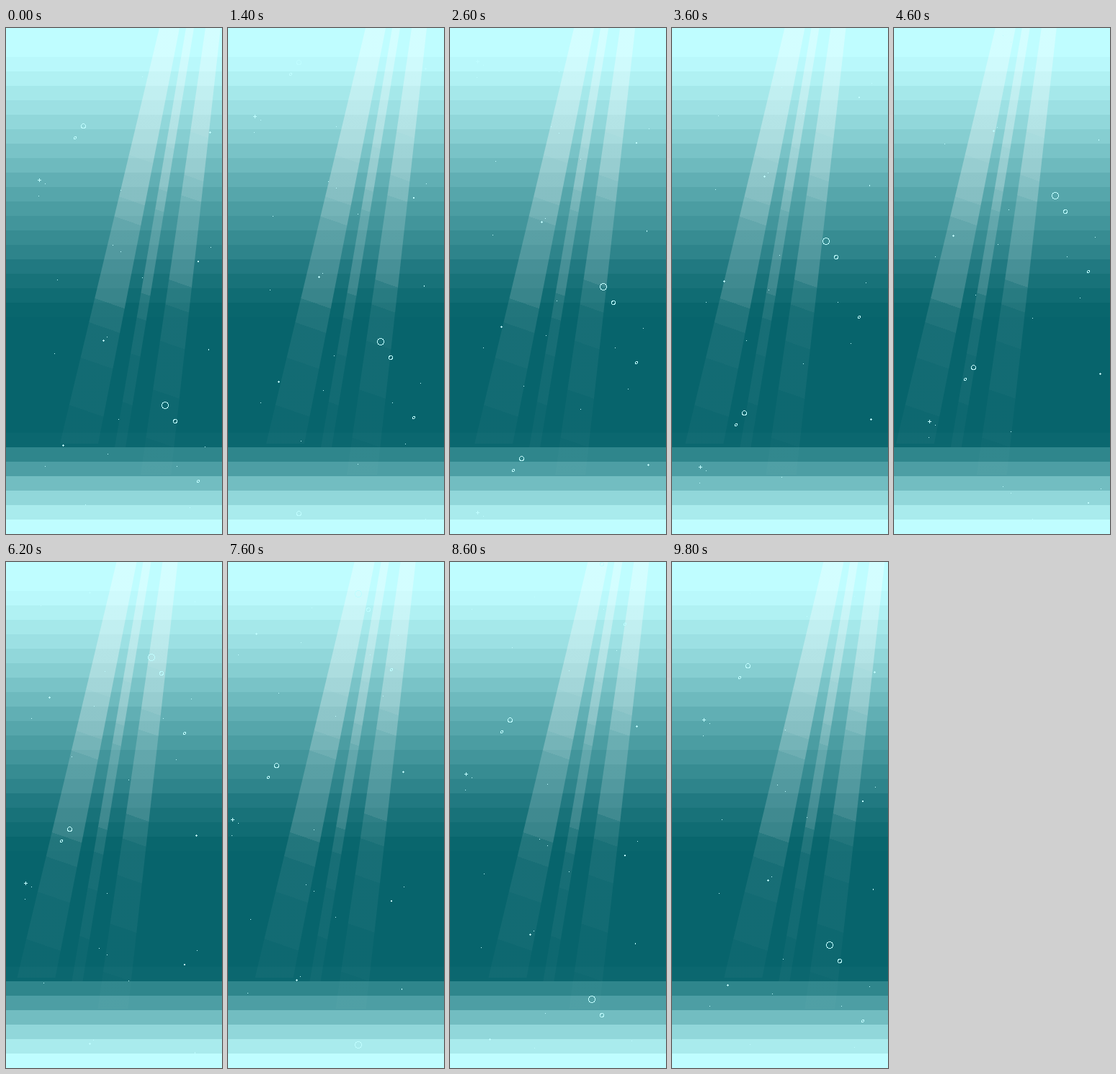
These frames come from a looping animation (300x700 px, 10 s). An HTML page without scripts:

```html
<!DOCTYPE html>
<html lang="en">
<head>
<meta charset="utf-8">
<title>Underwater light</title>
<style>
  :root { --light: #bffdff; --deep: #07646c; }
  html, body { margin: 0; width: 100%; height: 100%; overflow: hidden; background: var(--deep); }
  .sea { position: relative; width: 300px; height: 700px; overflow: hidden; }

  /* --k is the share of light in each 20px band */
  .band {
    display: block; height: 20px;
    background: color-mix(in srgb, var(--light) calc(var(--k) * 1%), var(--deep));
  }
  .deep { display: block; height: 160px; }

  .rays, .drift { position: absolute; top: 0; left: 0; width: 300px; }
  .rays { height: 620px; animation: sway 10s infinite; }
  .ray {
    --o: 0px;
    position: absolute; inset: 0;
    background: linear-gradient(199deg,
      #ffffff50 0 calc(150px + var(--o)),
      #ffffff48 0 calc(209px + var(--o)),
      #ffffff3c 0 calc(237px + var(--o)),
      #ffffff2c 0 calc(353px + var(--o)),
      #ffffff1a 0 calc(387px + var(--o)),
      #ffffff11 0 calc(437px + var(--o)),
      #ffffff0c 0 calc(504px + var(--o)),
      #ffffff07 0 calc(570px + var(--o)),
      #ffffff04 0);
  }
  .wide { --o: 58px; clip-path: polygon(213px 0, 241px 0, 128px 575px, 75px 575px); }
  .thin { --o: 30px; clip-path: polygon(250px 0, 261px 0, 166px 580px, 151px 580px); }
  .side { clip-path: polygon(277px 0, 298px 0, 229px 618px, 187px 618px); }

  .drift { height: 1900px; animation: rise 10s steps(50) infinite, wander 10s infinite; }
  .drift svg { display: block; overflow: visible; }

  @keyframes sway {
    0% { left: 0; animation-timing-function: steps(25); }
    50% { left: -78.5px; animation-timing-function: steps(25); }
    100% { left: .5px; }
  }
  @keyframes rise { from { top: -.4px; } to { top: -628.95px; } }
  @keyframes wander {
    0% { left: 0; animation-timing-function: steps(4); }
    8% { left: -17px; animation-timing-function: steps(1); }
    10% { left: -15px; animation-timing-function: steps(4); }
    18% { left: -3px; animation-timing-function: steps(1); }
    20% { left: -1px; animation-timing-function: steps(5); }
    30% { left: -13px; animation-timing-function: steps(8); }
    46% { left: 3px; animation-timing-function: steps(1); }
    48% { left: 2px; animation-timing-function: steps(14); }
    76% { left: -40px; animation-timing-function: steps(1); }
    78% { left: -39px; animation-timing-function: steps(10); }
    98% { left: -2px; animation-timing-function: steps(1); }
    100% { left: 0; }
  }
</style>
</head>
<body>
<div class="sea">
  <i class="band" style="--k:100"></i><i class="band" style="--k:100"></i>
  <i class="band" style="--k:97"></i><i class="band" style="--k:92"></i>
  <i class="band" style="--k:86"></i><i class="band" style="--k:81"></i>
  <i class="band" style="--k:75"></i><i class="band" style="--k:69"></i>
  <i class="band" style="--k:62"></i><i class="band" style="--k:56"></i>
  <i class="band" style="--k:49"></i><i class="band" style="--k:43"></i>
  <i class="band" style="--k:37"></i><i class="band" style="--k:32"></i>
  <i class="band" style="--k:26"></i><i class="band" style="--k:21"></i>
  <i class="band" style="--k:14"></i><i class="band" style="--k:9"></i>
  <i class="band" style="--k:5"></i><i class="band" style="--k:1"></i>
  <i class="deep"></i>
  <i class="band" style="--k:2"></i><i class="band" style="--k:22"></i>
  <i class="band" style="--k:38"></i><i class="band" style="--k:58"></i>
  <i class="band" style="--k:75"></i><i class="band" style="--k:88"></i>
  <i class="band" style="--k:100"></i>

  <div class="rays">
    <div class="ray wide"></div>
    <div class="ray thin"></div>
    <div class="ray side"></div>
  </div>

  <div class="drift">
    <svg width="300" height="1900" fill="none" stroke="#bffdff" shape-rendering="crispEdges">
      <g id="tile">
        <circle cx="221" cy="522" r="4.5"/>
        <circle cx="235" cy="544" r="2.5"/>
        <circle cx="107.5" cy="135.5" r="3"/>
        <circle cx="96" cy="152" r="1.5"/>
        <circle cx="267" cy="3" r="1.5"/>
        <!-- sparkles -->
        <path transform="translate(0 .5)" d="M44 210h5m-2.5-2.5v5
          M134 432h3m-1.5-1.5v3M78 577h3m-1.5-1.5v3M282 144h3m-1.5-1.5v3
          M266 322h2m0 1h-2M281 444h1m0 1h-1"/>
        <!-- specks -->
        <path transform="translate(0 .5)" d="M54 215h1M45 232h1M140 427h1M284 303h1
          M276 579h1M237 606h1M159 224h1M148 300h1M159 309h1M189 345h1M71 348h1
          M67 450h1M156 541h1M141 589h1M54 606h1M110 35h1M189 67h1M255 39h1"/>
      </g>
      <use href="#tile" y="624"/>
      <use href="#tile" y="1248"/>
    </svg>
  </div>
</div>
</body>
</html>
```
